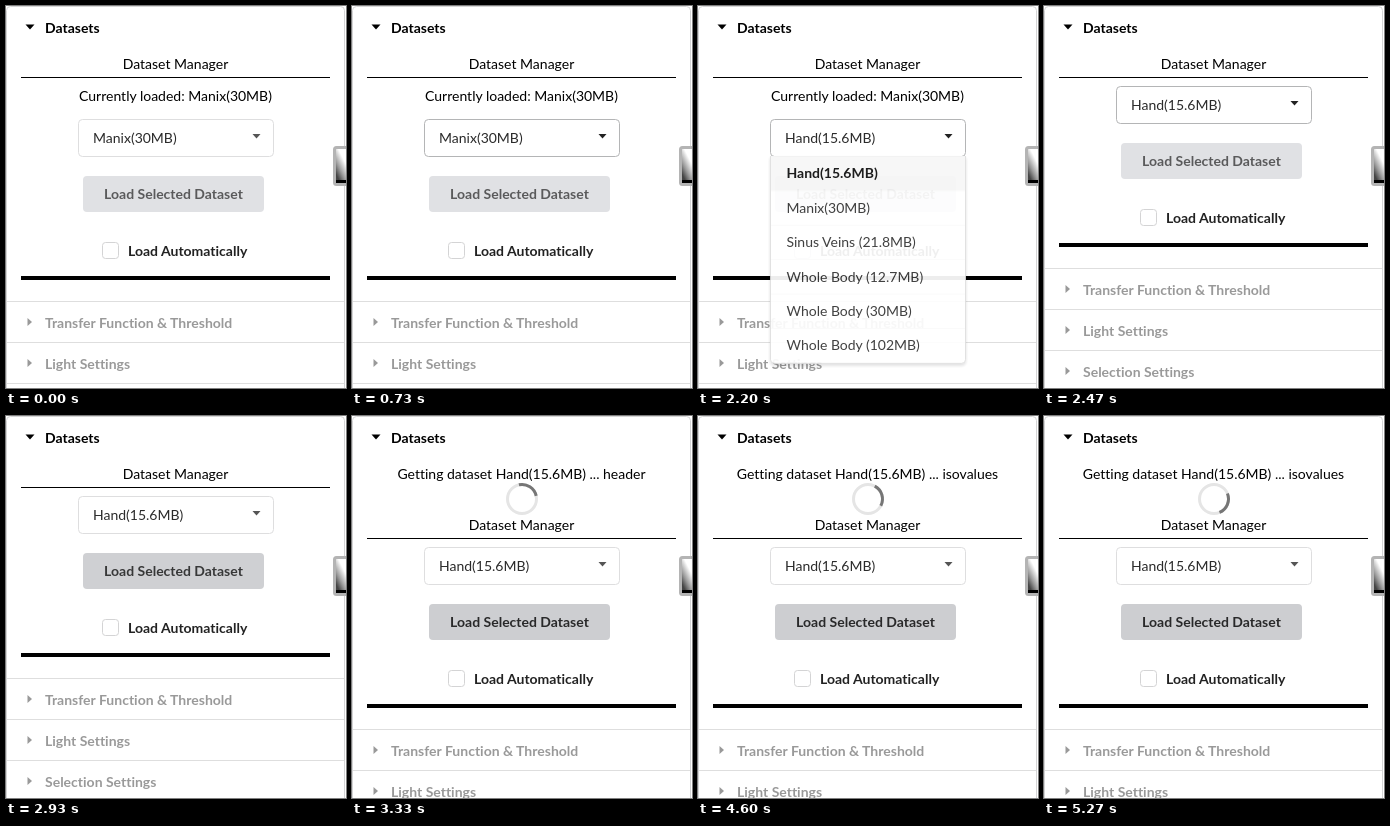
An HTML page that plays this animation: 340 px wide and 382 px high, repeating every 5340 ms.

```html
<!DOCTYPE html>
<html lang="en">
<head>
<meta charset="utf-8">
<title>Dataset Manager</title>
<style>
  html, body { margin: 0; width: 100%; height: 100%; overflow: hidden; background: #fff; }
  svg { display: block; font: 14px Lato, sans-serif; font-variant-ligatures: none; }
  .b { font-weight: 700; }
  .mid { text-anchor: middle; }
  .grey { fill: #000; fill-opacity: .4; }
  .box { fill: #fff; stroke: #dededf; }
  .line { fill: #dedede; }
  #frame { filter: drop-shadow(0 2px 1.5px rgba(34, 36, 38, .15)); }
</style>
</head>
<body>
<svg width="340" height="382" viewBox="0 0 340 382">
  <defs>
    <linearGradient id="shade" gradientUnits="userSpaceOnUse" x1="329" y1="166" x2="341" y2="160">
      <stop offset="0" stop-color="#444"/><stop offset=".4" stop-color="#999"/><stop offset="1" stop-color="#fff"/>
    </linearGradient>
  </defs>
  <rect x=".5" y=".5" width="338" height="400" rx="4" fill="#fff" stroke="#d4d4d5"/>
  <path d="M19.500 18.500h9l-4.500 5z"/>
  <text class="b" x="39" y="27">Datasets</text>

  <g id="loader">
    <text id="status" class="mid" x="169.500" y="63"></text>
    <circle cx="170" cy="83" r="14.500" fill="none" stroke="#e5e5e5" stroke-width="3"/>
    <path id="arc" d="M159.750 72.750A14.500 14.500 0 0 1 180.250 72.750" fill="none" stroke="#767676" stroke-width="3"/>
  </g>
  <g id="head">
    <text class="mid" x="169.500" y="63">Dataset Manager</text>
    <rect x="15" y="71" width="309" height="1"/>
  </g>
  <text id="loaded" class="mid" x="169.500" y="95">Currently loaded: Manix(30MB)</text>

  <g id="body">
    <g id="button">
      <rect x="77" y="170" width="181" height="36" rx="4"/>
      <text class="b mid" x="167.500" y="193">Load Selected Dataset</text>
    </g>
    <rect class="box" x="96.500" y="236.500" width="16" height="16" rx="3" style="stroke: #d4d4d5"/>
    <text class="b" x="122" y="250" fill="#222">Load Automatically</text>
    <rect x="15" y="270" width="309" height="4"/>
    <g id="sections"></g>
    <rect id="select" class="box" x="72.500" y="113.500" width="195" height="37" rx="4"/>
    <text id="choice" x="87" y="137"></text>
    <path id="caret" d="M246.500 128h8l-4 4.500z"/>
    <g id="menu">
      <path id="frame" d="M72.500 150v219q0 4 4 4h187q4 0 4-4v-219" fill="#fff"/>
      <rect id="pick" x="73" width="194" height="37" fill="#f7f7f7"/>
    </g>
  </g>

  <g id="handle">
    <rect x="328.500" y="141.500" width="20" height="37" rx="2" fill="url(#shade)" stroke="#b4b4b4" stroke-width="3"/>
    <rect x="330" y="174" width="10" height="3"/>
  </g>
</svg>
<script>
const $ = id => document.getElementById(id);
const LOOP = 5340, STEP = 200 / 3;
const sizes = ['Hand(15.6MB)', 'Manix(30MB)', 'Sinus Veins (21.8MB)',
  'Whole Body (12.7MB)', 'Whole Body (30MB)', 'Whole Body (102MB)'];

function add(parent, tag, attrs, text = '') {
  const el = document.createElementNS('http://www.w3.org/2000/svg', tag);
  for (const k in attrs) el.setAttribute(k, attrs[k]);
  el.textContent = text;
  return parent.appendChild(el);
}
const set = (id, name, value) => $(id).setAttribute(name, value);
const show = (id, on) => set(id, 'visibility', on ? 'visible' : 'hidden');
const shift = (id, y) => set(id, 'transform', `translate(0 ${y})`);
const clamp = x => Math.min(1, Math.max(0, x));
const mix = (a, b, p) => a + (b - a) * p;

const titles = ['Transfer Function & Threshold', 'Light Settings', 'Selection Settings'].map((name, i) => {
  const y = 295 + 41 * i, g = add($('sections'), 'g', { class: 'grey' });
  add($('sections'), 'rect', { class: 'line', x: 1, y, width: 337, height: 1 });
  add(g, 'path', { d: `M21.500 ${y + 17}v8l4.500-4z` });
  add(g, 'text', { class: 'b', x: 39, y: y + 27 }, name);
  return g;
});
const items = sizes.map((name, i) => {
  if (i) add($('menu'), 'rect', { x: 73, y: 150 + 37 * i, width: 194, height: 1, fill: '#fafafa' });
  return add($('menu'), 'text', { x: 88.500, y: 174 + 37 * i }, name);
});

// Vertical scale of the menu: slides open, later collapses
function menuScale(t) {
  if (t < 990 || t > 2460) return 0;
  if (t < 2190) return 1 - (1 - clamp((t - 950) / 180)) ** 2;
  return mix(.93, .19, clamp((t - 2200) / 133));
}

function draw(ms) {
  const t = Math.floor((ms + 4) / STEP) * STEP;
  const chosen = t > 2190, moved = t > 2260, loading = t > 3190;
  const open = t > 990 && !chosen, hover = t > 720 && t < 2520;

  show('loaded', !moved);
  show('loader', loading);
  shift('head', loading ? 51 : 0);
  shift('body', loading ? 18 : moved ? -33 : 0);
  $('status').textContent = 'Getting dataset Hand(15.6MB) ... ' + (t < 3790 ? 'header' : 'isovalues');
  set('arc', 'transform', `rotate(${113 + (t - 4067) * .6} 170 83)`);

  $('choice').textContent = sizes[chosen ? 0 : 1];
  set('choice', 'fill', '#2a2a2a');
  $('select').style.stroke = open ? '#a5c6d2' : hover ? '#b4b5b6' : '#dededf';
  set('caret', 'fill', hover ? '#222' : '#555');

  const s = menuScale(t), picked = chosen ? 0 : 1;
  show('menu', s > 0);
  set('menu', 'transform', `translate(0 ${150 * (1 - s)}) scale(1 ${s})`);
  set('menu', 'opacity', s);
  set('frame', 'stroke', open ? '#a5c6d2' : '#dedede');
  set('pick', 'y', 150 + 37 * picked);
  items.forEach((el, i) => {
    el.setAttribute('class', i === picked ? 'b' : '');
    el.setAttribute('fill', i === picked || (!i && t > 1720) ? '#0d0d0d' : '#333');
  });

  const p = clamp((t - 2800) / 200), c = Math.round(mix(225, 206, 1 - (1 - p) ** 2));
  $('button').firstElementChild.setAttribute('fill', `rgb(${c - 1},${c},${c + 3})`);
  $('button').lastElementChild.setAttribute('fill', `rgba(0,0,0,${mix(.6, .8, p)})`);
  titles[0].style.fillOpacity = t > 3990 && t < 4190 ? .7 : .4;
}

function tick(now) {
  draw(now % LOOP);
  requestAnimationFrame(tick);
}
draw(0);
requestAnimationFrame(tick);
</script>
</body>
</html>
```
